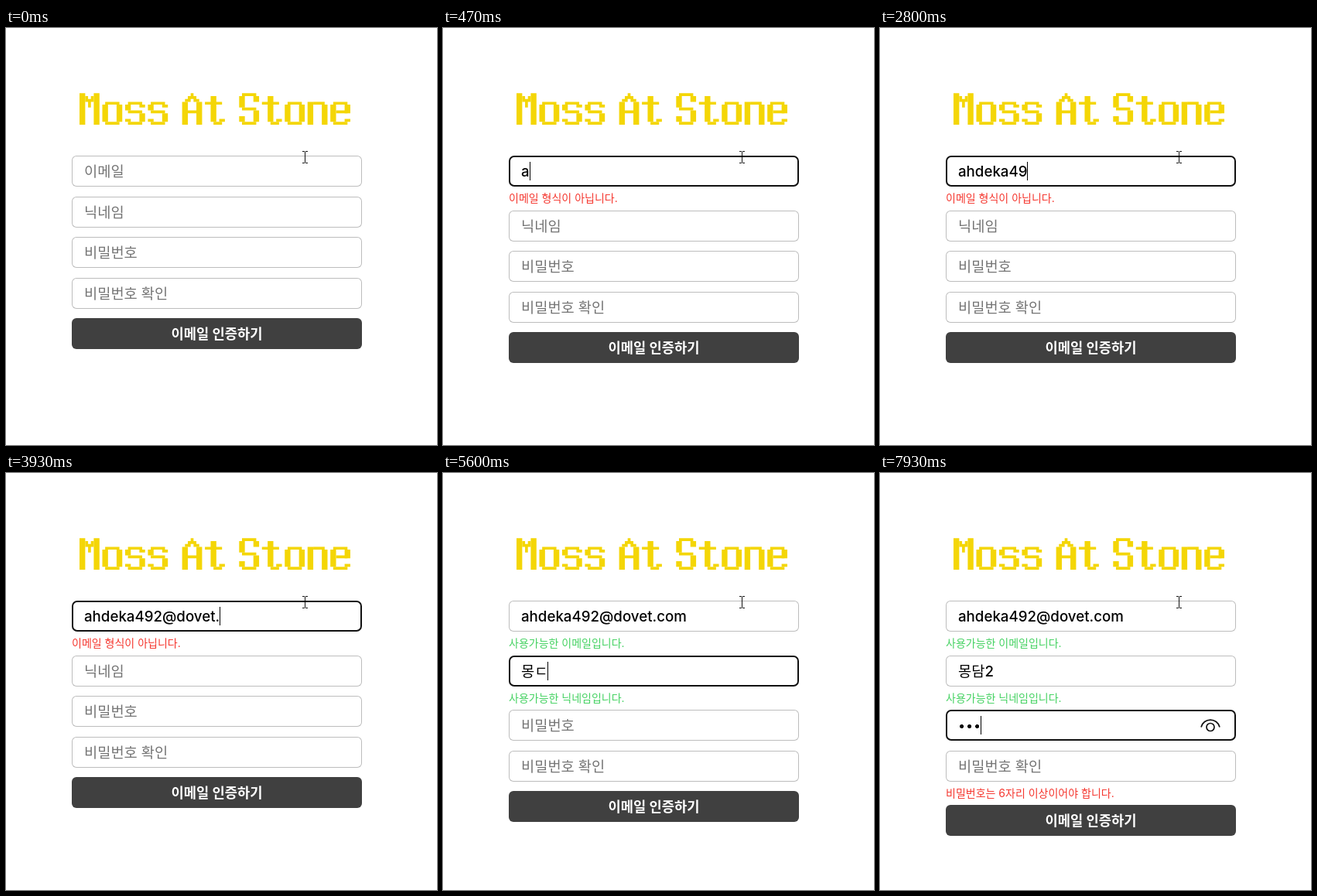
Recreate the animation shown at these times as an HTML page. Size 557 by 539 pixels, loop 8 s.

```html
<!DOCTYPE html>
<html lang="ko">
<head>
<meta charset="utf-8">
<title>Sign-up form</title>
<style>
html, body { margin: 0; width: 100%; height: 100%; overflow: hidden; background: #fff; }
body { font-family: Inter, "Noto Sans CJK KR", "Noto Sans", sans-serif; }
#stage { position: relative; width: 557px; height: 539px; overflow: hidden; }
#stage > *, #popup > * { position: absolute; white-space: pre; }
.field {
  left: 85px; width: 375px; height: 40px; box-sizing: border-box; padding-left: 16px;
  border-radius: 6px; box-shadow: inset 0 0 0 1px #bdbdbd;
  font-size: 18.7px; font-weight: 500; line-height: 42px; color: #000;
}
.field.focus { border-radius: 7px; box-shadow: inset 0 0 0 2px #111; }
.field > * { position: absolute; top: 0; left: 16px; }
.hint { color: #757575; }
.caret { display: none; top: 8px; width: 1px; height: 24px; background: #000; }
.dot { display: inline-block; vertical-align: top; width: 9.75px; height: 40px; background: radial-gradient(circle at 4.6px 21.5px, #000 2.2px, transparent 2.8px); }
.note { left: 85px; height: 19px; font-size: 14px; line-height: 19px; }
.bad { color: #f5372f; }
.good { color: #45d262; }
#button {
  left: 85px; width: 375px; height: 40px; border-radius: 6px; background: #404040; color: #fff;
  font-size: 17.7px; font-weight: 700; line-height: 42px; text-align: center;
}
#popup {
  left: 85px; top: 205px; width: 398px; height: 150px; border-radius: 8px; background: #fff;
  box-shadow: 0 5px 14px rgba(0,0,0,.4), 0 0 2px rgba(0,0,0,.4);
  font-family: "Noto Sans CJK KR", "Noto Sans", sans-serif; color: #222; line-height: 22px;
}
svg { left: 0; top: 0; overflow: visible; fill: none; }
</style>
</head>
<body>
<div id="stage">
  <svg id="title" width="557" height="140" role="img" aria-label="Moss At Stone"></svg>
  <div id="button">이메일 인증하기</div>
  <svg id="eye" width="26" height="14" stroke="#111" stroke-width="1.7">
    <path d="M1 10.5C4-2 22-2 25 10.5"/><circle cx="13" cy="10.5" r="5"/>
  </svg>
  <div id="popup">
    <span style="left:17px;top:10px;font-size:14.5px;color:#808080">저장된 정보에서 검색하려면 "/"를 입력하세요</span>
    <span style="left:17px;top:55px;font-size:14.1px;font-weight:700">admin@zefor.com</span>
    <span style="left:0;top:95px;width:398px;height:1px;background:#d9d9d9"></span>
    <span style="left:50px;top:110px;font-size:16px">개인 정보 관리</span>
    <svg width="398" height="150" stroke="#444" stroke-width="1.4">
      <path d="M374 16l10 10m0-10l-10 10"/>
      <circle cx="23" cy="117" r="3.6"/>
      <path d="M23 130h-6v-3q0-3 4-3h3"/>
      <rect x="24" y="123" width="10" height="8" rx="1.5" fill="#333" stroke="none"/>
      <path d="M26 126h6m-6 2.5h6" stroke="#fff" stroke-width="1"/>
    </svg>
  </div>
  <svg width="557" height="539" stroke="#111">
    <path d="M383 159.5h3m1 0h3M386.5 160v14M383 174.5h3m1 0h3"/>
  </svg>
</div>
<script>
const $ = id => document.getElementById(id);
const stage = $('stage');

// Title lettering: [stems, bars] on a grid seven wide, eleven high
const glyphs = {
  M: ['M1 0V11M6 0V11', 'M2 1.5H3M4 1.5H5M2 2.5H5M3 3.5H4M3 4.5H4'],
  A: ['M1 3V11M6 3V11', 'M3 .5H4M2 1.5H5M1 2.5H3M4 2.5H6M1 6.5H6'],
  S: ['M1 1V5M6 1V3M6 6V10M1 8V10', 'M1 .5H6M1 5.5H6M1 10.5H6'],
  o: ['M1 4V10M6 4V10', 'M1 3.5H6M1 10.5H6'],
  s: ['M1 4V6M6 4V5M6 7V10M1 9V10', 'M1 3.5H6M1 6.5H6M1 10.5H6'],
  t: ['M3 1V10M6 9V10', 'M0 3.5H6M3 10.5H6'],
  n: ['M1 3V11M6 4V11', 'M2 3.5H6'],
  e: ['M1 4V10M6 4V7M6 9V10', 'M1 3.5H6M2 6.5H6M1 10.5H6']
};
let pen = 0, art = '';
for (const ch of 'Moss At Stone') {
  if (ch === ' ') { pen += 4; continue; }
  const [stems, bars] = glyphs[ch];
  art += `<g transform="translate(${pen} 0)"><path d="${stems}" stroke-width="2"/><path d="${bars}"/></g>`;
  pen += 8;
}
$('title').innerHTML = `<g transform="translate(95 84.3) scale(3.684 3.7)" stroke="#f4d606">${art}</g>`;

function add(cls) {
  const el = document.createElement('div');
  el.className = cls;
  stage.insertBefore(el, $('button'));
  return el;
}

const hints = ['이메일', '닉네임', '비밀번호', '비밀번호 확인'];
const tops = [165, 218, 270, 323, 375];
const noteGap = 18;
const fields = hints.map(hint => {
  const box = add('field');
  box.innerHTML = `<span class="hint">${hint}</span><span class="value"></span><span class="caret"></span>`;
  const [label, value, caret] = box.children;
  return { box, label, value, caret, note: add('note') };
});

const emailBad = ['bad', '이메일 형식이 아닙니다.'];
const emailGood = ['good', '사용가능한 이메일입니다.'];
const nickBad = ['bad', '닉네임은 2자리 이상이어야 합니다.'];
const nickGood = ['good', '사용가능한 닉네임입니다.'];
const passBad = ['bad', '비밀번호는 6자리 이상이어야 합니다.'];

// [time, changes]; v = field values, n = notes
const steps = [
  [0, { focus: -1, caret: 1, popup: 0, v0: '', v1: '', v2: '', v3: '' }],
  [130, { focus: 0, popup: 1 }],
  [270, { v0: 'a', n0: emailBad, popup: .86 }],
  [330, { popup: .55 }],
  [400, { popup: .22 }],
  [470, { popup: 0 }],
  [800, { caret: 0 }],
  [930, { v0: 'ah', caret: 1 }],
  [1070, { v0: 'ahd' }],
  [1130, { v0: 'ahde' }],
  [1270, { v0: 'ahdek' }],
  [1330, { v0: 'ahdeka' }],
  [1600, { v0: 'ahdeka4' }],
  [1730, { v0: 'ahdeka495' }],
  [2130, { v0: 'ahdeka49' }],
  [2270, { caret: 0 }],
  [2800, { caret: 1 }],
  [3000, { v0: 'ahdeka492' }],
  [3130, { v0: 'ahdeka492@' }],
  [3400, { v0: 'ahdeka492@d' }],
  [3600, { v0: 'ahdeka492@do' }],
  [3670, { v0: 'ahdeka492@dov' }],
  [3730, { v0: 'ahdeka492@dove' }],
  [3870, { v0: 'ahdeka492@dovet' }],
  [3930, { v0: 'ahdeka492@dovet.' }],
  [4070, { v0: 'ahdeka492@dovet.c' }],
  [4130, { v0: 'ahdeka492@dovet.co' }],
  [4200, { v0: 'ahdeka492@dovet.com', n0: emailGood }],
  [4330, { focus: 1 }],
  [4730, { v1: 'a', n1: nickBad }],
  [5000, { v1: '' }],
  [5200, { v1: 'ㅁ' }],
  [5270, { v1: '모' }],
  [5400, { v1: '몽' }],
  [5530, { v1: '몽ㄷ', n1: nickGood }],
  [5670, { v1: '몽다' }],
  [5870, { v1: '몽담' }],
  [6000, { v1: '몽담2' }],
  [6330, { focus: 2 }],
  [6730, { v2: '*', n3: passBad }],
  [7270, { caret: 0 }],
  [7330, { v2: '', caret: 1 }],
  [7730, { v2: '*' }],
  [7870, { v2: '**' }],
  [7930, { v2: '***' }]
];
const states = [];
steps.reduce((prev, [, change], i) => states[i] = { ...prev, ...change }, {});

function draw(s) {
  let shift = 0;
  fields.forEach((f, i) => {
    const text = s['v' + i], note = s['n' + i], top = tops[i] + shift;
    const focused = s.focus === i;
    f.box.style.top = top + 'px';
    f.box.classList.toggle('focus', focused);
    f.label.style.display = text ? 'none' : '';
    if (i === 2) f.value.innerHTML = '<i class="dot"></i>'.repeat(text.length);
    else f.value.textContent = text;
    f.caret.style.display = focused && s.caret ? 'block' : 'none';
    f.caret.style.left = 16 + Math.round(f.value.getBoundingClientRect().width) + 'px';
    f.note.style.display = note ? '' : 'none';
    if (note) {
      f.note.className = 'note ' + note[0];
      f.note.textContent = note[1];
      f.note.style.top = top + 45 + 'px';
      shift += noteGap;
    }
    if (i === 2) {
      $('eye').style.cssText = `left:414px;top:${top + 12}px;display:${text ? 'block' : 'none'}`;
    }
  });
  $('button').style.top = tops[4] + shift + 'px';
  $('popup').style.opacity = s.popup;
}

const loop = 8000, start = performance.now();
let shown = -1;
function tick() {
  const t = Math.max(0, performance.now() - start) % loop;
  let i = steps.length - 1;
  while (steps[i][0] > t) i--;
  if (i !== shown) draw(states[shown = i]);
  requestAnimationFrame(tick);
}
tick();
</script>
</body>
</html>
```
